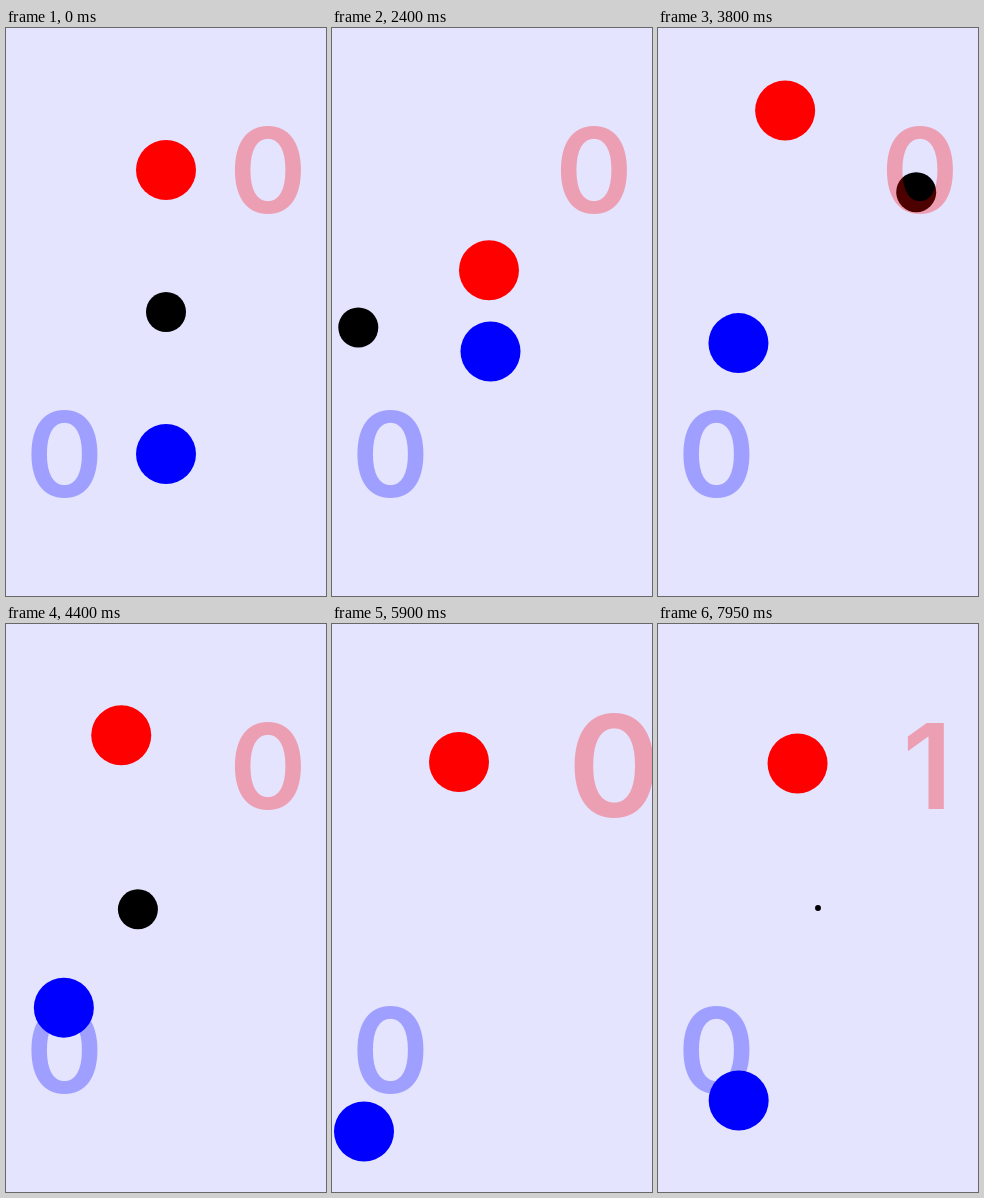
Write an HTML page with a canvas that moves like this. It is 320 px wide and 568 px high and loops after 8 s.

```html
<!DOCTYPE html>
<html lang="en">
<head>
<meta charset="utf-8">
<title>Table puck</title>
<style>
html, body { margin: 0; width: 100%; height: 100%; overflow: hidden; background: #e4e4ff; }
canvas { display: block; }
</style>
</head>
<body>
<canvas id="stage" width="320" height="568"></canvas>
<script>
const ctx = document.getElementById('stage').getContext('2d');
const W = 320, H = 568, LOOP = 8000;
const PADDLE = 30, PUCK = 20, LEFT = PUCK, RIGHT = W - PUCK;
const GOAL = 5360, PEAK = 6360, RESET = 7528, SPAWN = 7700;

const point = (t, x, y) => ({ t, x, y });
const centre = { x: W / 2, y: H / 2 };

// Each paddle starts from its home and is drawn back there at RESET.
const red = [
  point(400, W / 2, H / 4), point(800, 180, 84), point(1300, 187, 105.5),
  point(2050, 177, 123), point(2400, 157, 242.5), point(3700, 127, 32),
  point(3800, 127, 82.5), point(3950, 147, 92), point(5100, 66, 141),
  point(5600, 127, 138)
];
const blue = [
  point(1950, W / 2, H * 3 / 4), point(2160, 160, 334), point(2400, 158.5, 323.5),
  point(2600, 158, 320), point(3300, 31, 317), point(3800, 80.5, 315),
  point(5100, 31.5, 463.5), point(5400, 32, 507.5)
];

// The puck changes course at each touch; `wall` is the side it rebounds from on the way there.
const touches = [
  point(2160, centre.x, centre.y),
  { ...point(2580, 113, 311), wall: LEFT },
  { ...point(3300, 62, 279), wall: LEFT },
  { ...point(3950, 175, 130), wall: RIGHT },
  point(4850, 89, 440),
  point(5220, 99, 592)
];

const mix = (a, b, k) => a + (b - a) * k;
const between = (a, b, k) => ({ x: mix(a.x, b.x, k), y: mix(a.y, b.y, k) });
const ease = (t, start, span = 1000) => {
  const p = Math.min(1, Math.max(0, (t - start) / span));
  return (1 - Math.cos(Math.PI * p)) / 2;
};

// Straight legs; a leg with a wall is aimed at the mirror image, then folded back.
function along(path, t) {
  const i = path.findIndex(p => t < p.t);
  if (i === 0) return path[0];
  if (i < 0) return path[path.length - 1];
  const a = path[i - 1], b = path[i];
  const k = (t - a.t) / (b.t - a.t);
  if (b.wall === undefined) return between(a, b, k);
  const p = between(a, { x: 2 * b.wall - b.x, y: b.y }, k);
  const away = Math.abs(p.x - b.wall);
  return { x: b.wall + (b.wall === LEFT ? away : -away), y: p.y };
}

function disc({ x, y }, r, color) {
  ctx.fillStyle = color;
  ctx.beginPath();
  ctx.arc(x, y, r, 0, 2 * Math.PI);
  ctx.fill();
}

function paddle(path, t, color) {
  disc(between(along(path, t), path[0], ease(t, RESET)), PADDLE, color);
}

// Places the digit by the centre of its ink, scaled about the middle of its row.
function score(digit, x, y, scale, color) {
  ctx.save();
  ctx.translate(W / 2, y);
  ctx.scale(scale, scale);
  ctx.font = '600 118px Inter, sans-serif';
  ctx.fillStyle = color;
  const m = ctx.measureText(digit);
  const ink = (m.actualBoundingBoxRight - m.actualBoundingBoxLeft) / 2;
  ctx.fillText(digit, x - W / 2 - ink, 43);
  ctx.restore();
}

function draw(t) {
  ctx.fillStyle = '#e4e4ff';
  ctx.fillRect(0, 0, W, H);

  paddle(red, t, '#f00');
  paddle(blue, t, '#00f');
  if (t < SPAWN) disc(along(touches, t), PUCK, '#000');
  else disc(centre, PUCK * ease(t, SPAWN), '#000');

  const pop = 1 + 0.35 * (ease(t, GOAL) - ease(t, PEAK));
  const scored = t >= PEAK;
  score(scored ? '1' : '0', scored ? 268 : 261.5, H / 4, pop, 'rgba(255,0,0,0.3)');
  score('0', 58, H * 3 / 4, 1, 'rgba(0,0,255,0.3)');
}

const start = performance.now();
function tick() {
  draw((performance.now() - start) % LOOP);
  requestAnimationFrame(tick);
}
tick();
</script>
</body>
</html>
```
